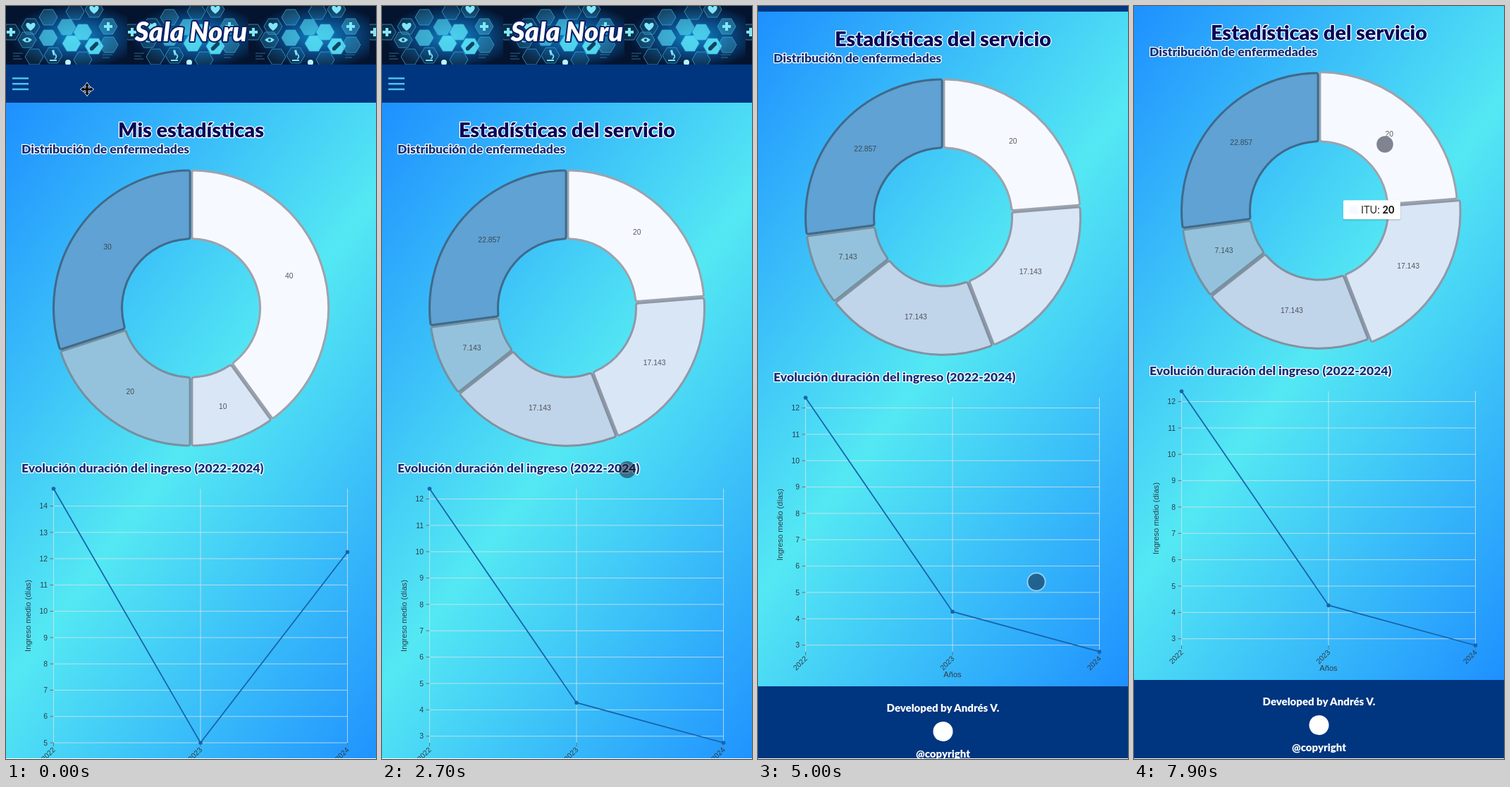
These frames come from a looping animation (525 by 1067 pixels, 8 s). An HTML page:

```html
<!DOCTYPE html>
<html lang="es">
<head>
<meta charset="utf-8">
<title>Estadísticas</title>
<style>
html, body { margin: 0; width: 100%; height: 100%; overflow: hidden; background: #fff; }
#stage { position: relative; width: 525px; height: 1066px; overflow: hidden; }
#page, #bg, svg, #tip { position: absolute; left: 0; top: 0; }
#bg { top: 137px; width: 525px; background: linear-gradient(127deg, #1e90ff, #54e8f3 50%, #1e90ff); }
text { font-family: "Liberation Sans", Arial, sans-serif; font-size: 10.4px; fill: #2f3b48; }
.title, .sub, .brand, .link { font-family: Lato, sans-serif; font-weight: 900; }
.title { font-size: 28.8px; fill: #08085a; }
.sub { font-size: 17.6px; fill: #12307a; }
.title, .sub { stroke: #fff; stroke-width: 2.6px; stroke-linejoin: round; paint-order: stroke; }
.brand { font-size: 38px; font-style: italic; fill: #fff; stroke: #0a1f66;
  stroke-width: 4px; stroke-linejoin: round; paint-order: stroke; }
.link { font-size: 15px; fill: #fff; }
.mid { text-anchor: middle; }
.end { text-anchor: end; }
.value { fill: #333; fill-opacity: .8; }
.axis { font-size: 11.1px; }
#tip { display: flex; align-items: center; height: 27px; padding: 0 9px; box-sizing: border-box;
  background: #fff; border-radius: 2px; box-shadow: 0 1px 2px rgba(0,0,0,.25);
  font: 14.5px/27px Lato, sans-serif; color: #333; white-space: pre; }
#tip i { width: 12px; height: 12px; margin-right: 4px; }
#tip b { color: #111; }
</style>
</head>
<body>
<div id="stage">
  <div id="page">
    <div id="bg"></div>
    <svg width="525" height="1420">
      <defs>
        <radialGradient id="glow" cx=".58" cy=".52" r=".55">
          <stop offset="0" stop-color="#1287c4"/>
          <stop offset=".5" stop-color="#0a4a86"/>
          <stop offset="1" stop-color="#04142f"/>
        </radialGradient>
        <pattern id="tiles" width="172" height="83" patternUnits="userSpaceOnUse"></pattern>
      </defs>
      <rect width="525" height="83" fill="url(#tiles)"/>
      <text class="brand mid" x="262.5" y="50">Sala Noru</text>
      <rect y="83" width="525" height="54" fill="#00357f"/>
      <path d="M9 102.5H32M9 110.3H32M9 118H32" stroke="#4cc3ea" stroke-width="2.6"/>
      <g id="menu"></g>
      <g id="content">
        <g id="own"></g>
        <g id="service"></g>
        <rect y="1093" width="525" height="111" fill="#00357f"/>
        <text class="link mid" x="262.5" y="1129">Developed by Andrés V.</text>
        <circle cx="262.5" cy="1157" r="14" fill="#fff"/>
        <text class="link mid" x="262.5" y="1194">@copyright</text>
      </g>
    </svg>
  </div>
  <div id="tip"></div>
  <svg width="525" height="1066">
    <g id="cursor">
      <path id="arrows" d="M0-9L3-5H1.5V-1.5H5V-3L9 0 5 3V1.5H1.5V5H3L0 9-3 5H-1.5V1.5H-5V3L-9 0-5-3V-1.5H-1.5V-5H-3Z"
        stroke="#fff" stroke-width="1.4" paint-order="stroke"/>
      <g id="touch">
        <circle r="12" fill="rgba(20,24,45,.52)"/>
        <circle id="ring" r="12.6" fill="none" stroke="rgba(255,255,255,.45)" stroke-width="2"/>
      </g>
    </g>
  </svg>
</div>
<script>
const $ = id => document.getElementById(id);
const show = (id, on) => $(id).style.display = on ? '' : 'none';
const clamp = x => Math.max(0, Math.min(1, x));
const mix = (a, b, p) => a + (b - a) * p;
const text = (cls, x, y, s, extra = '') => `<text class="${cls}" x="${x}" y="${y}" ${extra}>${s}</text>`;

// Banner: hexagons with small medical icons
const icons = {
  plus: 'M-2-6H2V-2H6V2H2V6H-2V2H-6V-2H-2Z',
  heart: 'M0 6C-12-2-5-9 0-3C5-9 12-2 0 6Z',
  eye: 'M-7 0Q0-7 7 0Q0 7-7 0ZM-2 0A2 2 0 1 0 2 0A2 2 0 1 0-2 0Z',
  pill: 'M-6 2L2-6Q7-7 6-2L-2 6Q-7 7-6 2Z',
  scope: 'M-2-7L1-8 3-1 0 0ZM-5 6H5V8H-5ZM3-3Q8 3 2 6V4Q5 2 2-1Z',
  none: ''
};
const hexes = [
  [7, 37, .1, 'plus'], [35, 29, .1, 'heart'], [30, 48, .15, 'eye'], [60, 45, .6, 'none'],
  [67, 70, .08, 'scope'], [86, 30, .55, 'none'], [93, 53, .85, 'none'], [109, 37, .75, 'none'],
  [125, 57, .9, 'pill'], [125, 5, .15, 'heart'], [145, 29, .3, 'plus'], [146, 55, .25, 'none'],
  [60, 16, .2, 'none'], [98, 8, .1, 'none'], [40, 72, .08, 'none'], [109, 76, .1, 'none']
];
$('tiles').innerHTML = '<rect width="172" height="83" fill="url(#glow)"/>' + hexes.map(([x, y, alpha, icon]) =>
  `<g transform="translate(${x} ${y})"><path d="M-13 0L-6.5-11H6.5L13 0 6.5 11H-6.5Z" fill="#5ae6fa"
    fill-opacity="${alpha}" stroke="#3aaede" stroke-opacity=".7"/><path d="${icons[icon]}"
    fill="${alpha > .7 ? '#0b4566' : '#7fe6fa'}" fill-rule="evenodd"/></g>`).join('') +
  '<circle cx="88" cy="80" r="4" fill="#b9f6ff"/>' +
  '<path d="M10 67H24M10 71H20M10 75H23M137 69H151M137 73H147" stroke="#3f8fb5" stroke-width=".7"/>';

$('menu').innerHTML = '<rect y="137" width="525" height="184" fill="#00347e"/>' +
  '<path d="M0 137H525" stroke="#10458a"/>' +
  ['Home', 'Mis stats', 'Stats Servicio', 'Log out'].map((s, i) => text('link mid', 262.5, 164 + 46 * i, s)).join('');

// Doughnut
const CX = 262.5, CY = 428, INNER = 98, OUTER = 195;
const palette = {
  white: ['#f6f9ff', '#9fa2ab'], pale: ['#d9e6f6', '#9098a8'], soft: ['#c0d4ea', '#84909f'],
  sky: ['#94c2dc', '#76909f'], blue: ['#5fa2d3', '#40698a']
};
const polar = (r, a) => `${(CX + r * Math.sin(a)).toFixed(2)} ${(CY - r * Math.cos(a)).toFixed(2)}`;

function slicePath(a, b, outer) {
  const gap = 1.4, c = 3;
  const at = (r, angle, inset) => polar(r, angle + inset / r);
  const big = b - a > Math.PI ? 1 : 0;
  return `M${at(outer - c, a, gap)}Q${at(outer, a, gap)} ${at(outer, a, gap + c)}` +
    `A${outer} ${outer} 0 ${big} 1 ${at(outer, b, -gap - c)}Q${at(outer, b, -gap)} ${at(outer - c, b, -gap)}` +
    `L${at(INNER + c, b, -gap)}Q${at(INNER, b, -gap)} ${at(INNER, b, -gap - c)}` +
    `A${INNER} ${INNER} 0 ${big} 0 ${at(INNER, a, gap + c)}Q${at(INNER, a, gap)} ${at(INNER + c, a, gap)}Z`;
}

function doughnut(slices, grow = []) {
  const total = slices.reduce((sum, s) => sum + s[0], 0);
  let a = 0, paths = '', labels = '';
  slices.forEach(([value, tone], i) => {
    const b = a + value / total * 2 * Math.PI, outer = OUTER + (grow[i] || 0);
    const [fill, stroke] = palette[tone];
    paths += `<path d="${slicePath(a, b, outer)}" fill="${fill}" stroke="${stroke}" stroke-width="3"/>`;
    const [x, y] = polar((INNER + outer) / 2, (a + b) / 2).split(' ');
    labels += text('mid value', x, +y + 3.2, value);
    a = b;
  });
  return paths + labels;
}

// Line chart
function lineChart(points, firstTick) {
  const xs = [67.5, 276, 484.5], top = 684, bottom = 1044;
  const min = Math.min(...points), max = Math.max(...points);
  const yOf = v => bottom - (v - min) / (max - min) * (bottom - top);
  let grid = '', ticks = '', labels = '';
  for (let v = firstTick; v < firstTick + 10; v++) {
    const y = yOf(v);
    grid += `M67.5 ${y}H484.5`;
    ticks += `M62.5 ${y}H67.5`;
    labels += text('end', 59, y + 3.7, v);
  }
  xs.forEach((x, i) => {
    grid += `M${x} ${top}V${bottom}`;
    ticks += `M${x} ${bottom}v5`;
    labels += text('end', 0, 3.6, 2022 + i, `transform="translate(${x + .5} ${bottom + 8}) rotate(-45)"`);
  });
  const dots = points.map((v, i) => `<circle cx="${xs[i]}" cy="${yOf(v)}" r="2.8" fill="#1764ab"/>`).join('');
  return `<path d="${grid}" stroke="#dde4ea" stroke-opacity=".75"/><path d="${ticks}" stroke="#66757f"/>` +
    `<path d="M${points.map((v, i) => xs[i] + ' ' + yOf(v)).join('L')}" fill="none" stroke="#1764ab" stroke-width="1.8"/>` +
    dots + labels + text('mid axis', 276, bottom + 36, 'Años') +
    text('mid axis', 0, 4, 'Ingreso medio (días)', `transform="translate(31 ${(top + bottom) / 2}) rotate(-90)"`);
}

const view = (title, slices, points, firstTick) => text('title mid', 262.5, 186, title) +
  text('sub', 22, 209, 'Distribución de enfermedades') + `<g class="pie">${doughnut(slices)}</g>` +
  text('sub', 22, 661, 'Evolución duración del ingreso (2022-2024)') + lineChart(points, firstTick);

const serviceSlices = [[20, 'white'], [17.143, 'pale'], [17.143, 'soft'], [7.143, 'sky'], [22.857, 'blue']];
$('own').innerHTML = view('Mis estadísticas',
  [[40, 'white'], [10, 'pale'], [20, 'sky'], [30, 'blue']], [14.66, 5, 12.25], 5);
$('service').innerHTML = view('Estadísticas del servicio', serviceSlices, [12.39, 4.27, 2.75], 3);
const servicePie = document.querySelector('#service .pie');

// Timeline
const LOOP = 8000, OPEN = 600, SWITCH = 1600, TAP = 6600, RETAP = 7800;
const cursorKeys = [[0, 115, 118], [400, 22, 110], [650, 22, 110], [1200, 222, 238], [1400, 255, 250],
  [1650, 255, 250], [2700, 348, 657], [3200, 395, 816], [5450, 395, 816], [6300, 347, 387],
  [7400, 347, 387], [7750, 356, 196], [LOOP, 356, 196]];
const scrollKeys = [[0, 0], [3600, 0], [3800, 18], [4300, 88], [5000, 129], [5400, 138], [LOOP, 138]];
const smooth = p => p * p * (3 - 2 * p);

function sample(keys, t, ease = p => p) {
  const i = keys.findIndex(k => k[0] > t), a = keys[i - 1], b = keys[i];
  const p = ease((t - a[0]) / (b[0] - a[0]));
  return a.slice(1).map((v, j) => mix(v, b[j + 1], p));
}

let tipLabel = '';
function setTip(name, value, color) {
  if (tipLabel === name) return;
  tipLabel = name;
  $('tip').innerHTML = `<i style="background:${color}"></i>${name}: <b>${value}</b>`;
}

function frame(now) {
  const t = now % LOOP;
  const open = t >= OPEN && t < SWITCH;
  show('menu', open);
  show('own', t < SWITCH);
  show('service', t >= SWITCH);
  $('bg').style.height = (open ? 1162 : 956) + 'px';
  $('content').setAttribute('transform', `translate(0 ${open ? 206 : 0})`);
  $('page').style.transform = `translateY(${-sample(scrollKeys, t)[0]}px)`;

  const [x, y] = sample(cursorKeys, t, smooth);
  $('cursor').setAttribute('transform', `translate(${x} ${y})`);
  show('arrows', t < 100);
  show('touch', t >= 100);
  show('ring', t < SWITCH || t > 2900);

  // Tapped slice grows; the tooltip glides to the next tap
  const grow = clamp((t - TAP) / 400), move = clamp((t - RETAP) / 500);
  servicePie.innerHTML = doughnut(serviceSlices, [7 * move, 7 * grow * (1 - move)]);
  show('tip', t >= TAP);
  if (t < RETAP) setTip('EPOC', 17.143, palette.pale[0]);
  else setTip('ITU', 20, palette.white[0]);
  const glide = 1 - (1 - move) ** 2;
  $('tip').style.transform = `translate(${mix(286, 316, glide)}px, ${mix(344, 155, glide)}px)`;
  requestAnimationFrame(frame);
}
requestAnimationFrame(frame);
</script>
</body>
</html>
```
